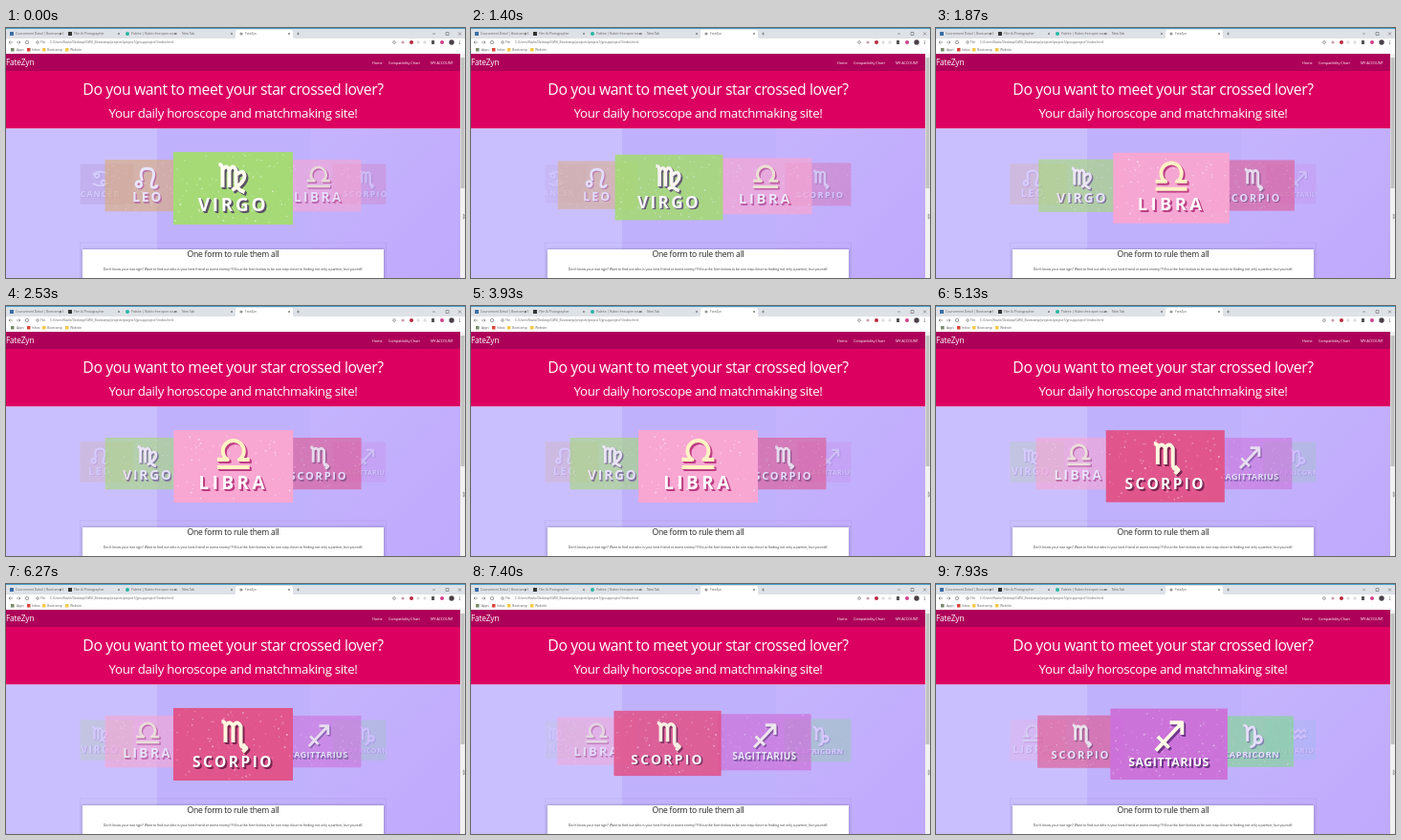
An HTML page for the animation above (8 s loop, 480 by 262 pixels).

```html
<!DOCTYPE html>
<html lang="en">
<head>
<meta charset="utf-8">
<title>FateZyn</title>
<style>
  html, body { margin: 0; width: 100%; height: 100%; overflow: hidden; }
  svg { display: block; width: 100%; height: 100%; font-family: "Open Sans", "Noto Sans", sans-serif; }
  text { letter-spacing: -.025em; }
  .mid { text-anchor: middle; }
  .ui { font-size: 3.45px; fill: #666; }
  .nav { font-size: 3.85px; }
  .icon { fill: none; stroke-width: 4; stroke-linejoin: round; }
  .label { font-weight: 700; text-anchor: middle; }
  #form { filter: drop-shadow(0 .5px 1.5px #0005); }
</style>
</head>
<body>
<svg viewBox="0 0 480 262">
  <defs>
    <clipPath id="window"><rect x="77.5" y="108" width="320" height="124"/></clipPath>
    <linearGradient id="right" x2="1" y2="1"><stop stop-color="#c5b4fd"/><stop offset="1" stop-color="#bfa9fc"/></linearGradient>
  </defs>

  <!-- browser window -->
  <rect width="480" height="27" fill="#fff"/>
  <rect width="480" height="11" fill="#dee1e6"/>
  <rect width="480" height="1" fill="#45a3cf"/>
  <path d="M239 11q1 0 1-2V4q0-2 2-2h56q2 0 2 2v5q0 2 1 2z" fill="#fff"/>
  <g class="ui">
    <rect x="4" y="4" width="4" height="4" fill="#3b6ea5"/><text x="10" y="7.3">Coursement Detail | Bootcamp S</text>
    <rect x="65" y="4" width="4" height="4" fill="#333"/><text x="71" y="7.3">Film &amp; Photographer</text>
    <circle cx="127" cy="6" r="2" fill="#27b5a5"/><text x="131" y="7.3">Palette | Rubric free open sourc</text>
    <text x="184" y="7.3">New Tab</text>
    <circle cx="246" cy="6" r="1.6" fill="#999"/><text x="250" y="7.3">FateZyn</text>
    <text x="36" y="16.3">File</text>
    <text x="46" y="16.3">C:/Users/Kavlo/Desktop/GWU_Bootcamp/projects/project1/groupproject1/index.html</text>
    <rect x="5" y="21" width="3.5" height="3.5" fill="#7a8a6a"/><text x="11" y="24.2">Apps</text>
    <rect x="22" y="21" width="3.5" height="3.5" fill="#d8453a"/><text x="27" y="24.2">Inbox</text>
    <rect x="38" y="21" width="3.5" height="3.5" fill="#f2c94c"/><text x="43" y="24.2">Bootcamp</text>
    <rect x="62" y="21" width="3.5" height="3.5" fill="#f2c94c"/><text x="67" y="24.2">Website</text>
  </g>
  <g fill="none" stroke="#666" stroke-width=".6">
    <path d="M56 5l2 2m0-2l-2 2M117 5l2 2m0-2l-2 2M176 5l2 2m0-2l-2 2M235 5l2 2m0-2l-2 2M295 5l2 2m0-2l-2 2M304 6h3m-1.5-1.5v3"/>
    <path d="M446 6h3M460 4.5h3v3h-3zM473 4.5l3 3m0-3l-3 3M7 15H3l1.5-1.5M3 15l1.5 1.5M11 15h4l-1.5-1.5M15 15l-1.5 1.5"/>
    <circle cx="22" cy="15" r="1.7"/><circle cx="33" cy="15" r="1.3"/><circle cx="406" cy="15" r="1.4"/>
  </g>
  <circle cx="415" cy="15" r="1.6" fill="#c9a0aa"/>
  <circle cx="424" cy="15" r="2" fill="#b8283c"/>
  <circle cx="431" cy="15" r="1.7" fill="#ddd"/>
  <circle cx="438" cy="15" r="1.7" fill="#ddd"/>
  <rect x="445" y="13" width="3" height="4" fill="#555"/>
  <circle cx="456" cy="15" r="2" fill="#d0408c"/>
  <circle cx="466" cy="15" r="2.7" fill="#4a4048"/>
  <path d="M474.5 13.5v.7m0 .6v.7m0 .6v.7" stroke="#666"/>

  <!-- page -->
  <rect y="27" width="475" height="18" fill="#ad0059"/>
  <rect y="45" width="475" height="60.5" fill="#dc0061"/>
  <rect y="105.5" width="158" height="157" fill="#cabffe"/>
  <rect x="158" y="105.5" width="161" height="157" fill="#c0b1fc"/>
  <rect x="319" y="105.5" width="156" height="157" fill="url(#right)"/>
  <g fill="#fff">
    <text x="0" y="39" font-size="8.4">FateZyn</text>
    <g class="nav">
      <text x="383" y="37.5">Home</text>
      <text x="400" y="37.5">Compatibility Chart</text>
      <text x="444" y="37.5">MY ACCOUNT</text>
    </g>
    <g class="mid">
      <text x="237.5" y="69.5" font-size="15.75">Do you want to meet your star crossed lover?</text>
      <text x="237.5" y="94" font-size="13.3">Your daily horoscope and matchmaking site!</text>
    </g>
  </g>
  <g clip-path="url(#window)"><g id="carousel"></g></g>
  <rect x="77.5" y="225" width="320" height="50" fill="none" stroke="#503c90" stroke-width=".6" opacity=".15"/>
  <rect id="form" x="80" y="232" width="315" height="40" fill="#fff"/>
  <g class="mid" fill="#222">
    <text x="237.5" y="239.7" font-size="8.57">One form to rule them all</text>
    <text x="237.5" y="254.3" font-size="3.62" fill="#444">Don't know your star sign? Want to find out who is your best friend or worst enemy? Fill out the form below to be one step closer to finding not only a partner, but yourself.</text>
  </g>
  <rect x="475" y="27" width="5" height="235" fill="#f1f1f1"/>
  <rect x="475.5" y="31" width="4" height="137" fill="#c1c1c1"/>
  <path d="M478.3 195v5l1.2-1.1h.5v-2.2z" fill="#fff" stroke="#333" stroke-width=".4"/>
</svg>

<script>
// name, card colour, shadow colour, icon colour, font size, letter spacing (em), icon path
const signs = [
  ["CANCER", "#a878b0", "#6a4478", "#fff", 16, .12, "M-10-16a4 4 0 1 1 0 .1M-14-18q12-10 28-1M10-3a4 4 0 1 1 0-.1M14-2q-12 10-28 1"],
  ["LEO", "#dcac74", "#b0486c", "#fff", 19, .15, "M-9-2a4 4 0 1 1 0-.1M-8-7q-6-18 7-18q13 0 9 14q-6 14 1 14q4 0 5-4"],
  ["VIRGO", "#a5da76", "#5b5265", "#fffdf0", 19, .14, "M-15-25q4 0 4 5V-1M-11-19q4-7 7 0V-1M-4-19q4-7 7 0V-5q0 6 9 9M3-14q8-7 9 1q0 7-13 15"],
  ["LIBRA", "#f8a6d2", "#bd3d83", "#fff3c4", 19, .18, "M-17 1H17M-17-7H-6q-5-3-5-9a11 11 0 0 1 22 0q0 6-5 9H17"],
  ["SCORPIO", "#e0558c", "#7c2450", "#fff6e0", 15.5, .16, "M-12-24q4 0 4 5V-2M-8-19q4-7 8 0V-2M0-19q4-7 8 0V-2q0 6 6 6M10 0l4 4l-4 4"],
  ["SAGITTARIUS", "#cd72da", "#6e3387", "#fffbe8", 12.5, .05, "M-14 7L14-23M1-23H14V-10M-12-8L0 4"],
  ["CAPRICORN", "#7cdc88", "#4f6b78", "#fff", 13, .07, "M-12-24q6 0 6 8V0M-6-16q10-12 11 2V0q0 8-7 8M5-3a5 5 0 1 1 0 .1"],
  ["AQUARIUS", "#78c8e0", "#43759b", "#fff", 14, .08, "M-16-14l6-6l5 6l6-6l5 6l6-6l4 5M-16-3l6-6l5 6l6-6l5 6l6-6l4 5"],
];
const WIDTH = 125, HEIGHT = 76, CENTER = 237.5, HORIZON = 158;
const FIRST = 2, LOOP = 8000, STEP = 200 / 3, TAU = 200;
const starts = [1337, 4335, 7333];

let seed = 7;
const random = () => (seed = seed * 16807 % 2147483647) / 2147483647;

function speckles() {
  let dots = "";
  for (let i = 0; i < 110; i++) {
    const x = (random() - .5) * (WIDTH - 3), y = (random() - .5) * (HEIGHT - 3);
    dots += `<circle cx="${x}" cy="${y}" r="${.3 + random() * .8}" opacity="${.1 + random() * .4}"/>`;
  }
  return `<g fill="#fff">${dots}</g>`;
}

function emblem([name, , , , size, spacing, path], offset, iconColor, textColor) {
  return `<g transform="translate(${offset} ${offset})">
    <path class="icon" d="${path}" stroke="${iconColor}"/>
    <text class="label" y="24" font-size="${size}" style="letter-spacing:${spacing}em" fill="${textColor}">${name}</text></g>`;
}

const carousel = document.getElementById("carousel");
const cards = signs.map((sign, index) => {
  const [, color, shadow, light] = sign;
  const node = document.createElementNS("http://www.w3.org/2000/svg", "g");
  node.innerHTML = `<rect x="${-WIDTH / 2}" y="${-HEIGHT / 2}" width="${WIDTH}" height="${HEIGHT}" fill="${color}"/>`
    + speckles() + emblem(sign, 2, shadow, shadow) + emblem(sign, 1, shadow, shadow) + emblem(sign, 0, light, "#fff");
  return { node, index };
});

// Each advance eases out exponentially by one card.
const position = t => starts.reduce((p, s) => t > s ? p + 1 - Math.exp((s - t) / TAU) : p, FIRST);

function draw(now) {
  const t = Math.floor((now % LOOP + 4) / STEP) * STEP;
  const p = position(t);
  for (const card of cards) {
    const d = card.index - p, scale = 1 / (1 + .4 * Math.abs(d));
    card.depth = Math.abs(d);
    card.node.setAttribute("transform", `translate(${CENTER + WIDTH * d * scale} ${HORIZON + 10 * scale}) scale(${scale})`);
    card.node.setAttribute("opacity", Math.max(0, 1 - .4 * card.depth));
  }
  carousel.append(...[...cards].sort((a, b) => b.depth - a.depth).map(card => card.node));
  requestAnimationFrame(() => draw(performance.now()));
}
draw(performance.now());
</script>
</body>
</html>
```
